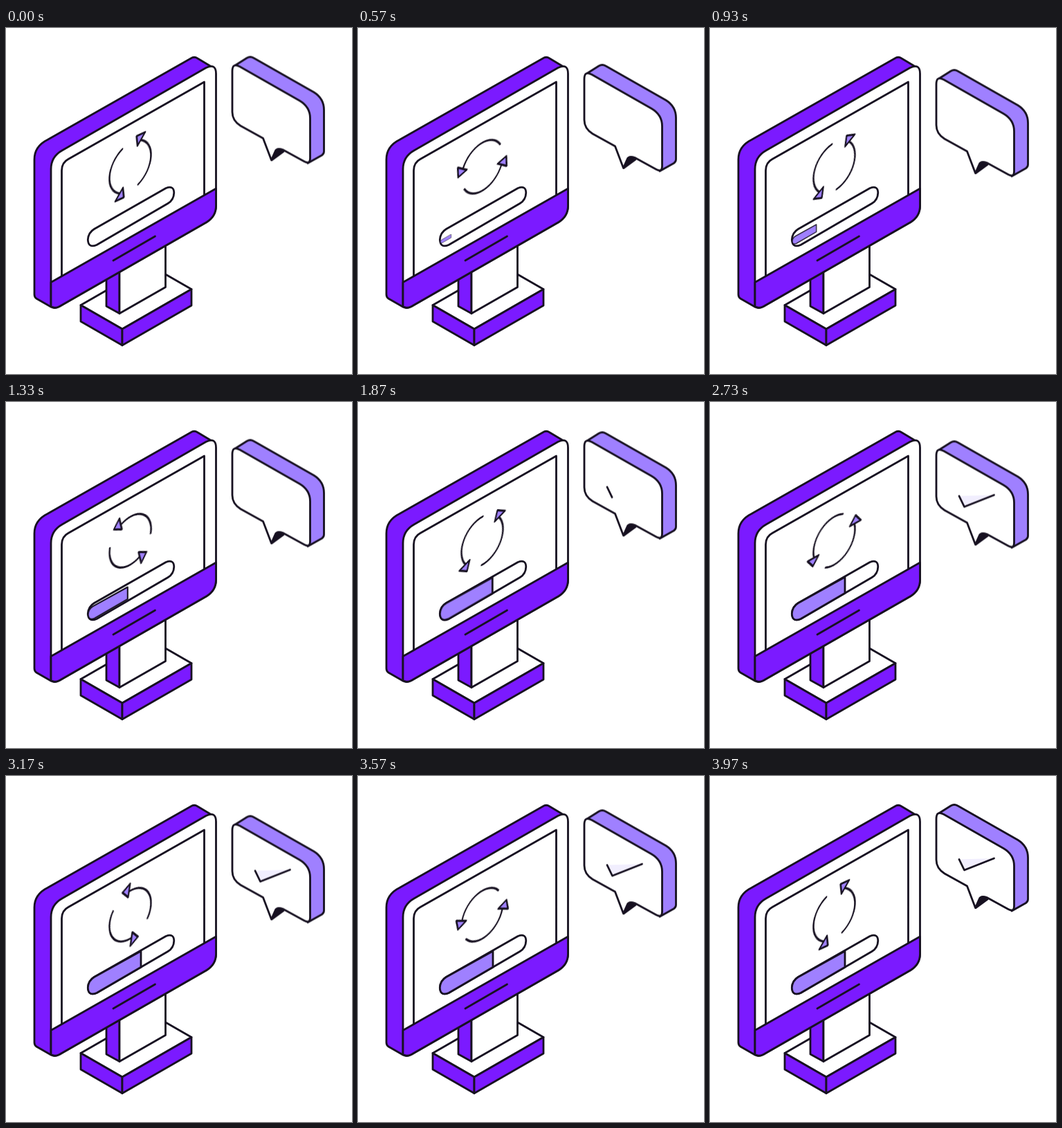
An HTML page without scripts for the animation above (4 s loop, 500x500 px).

```html
<!DOCTYPE html>
<html lang="en">
<head>
<meta charset="utf-8">
<title>Updating</title>
<style>
  :root {
    --ink: #171121;
    --violet: #7b1aff;
    --lilac: #9f80ff;
  }
  html, body { margin: 0; width: 100%; height: 100%; overflow: hidden; background: #fff; }
  svg { display: block; width: 100vw; height: 100vh; }
  .art { stroke: var(--ink); stroke-width: 2.8; stroke-linejoin: round; stroke-linecap: round; fill: none; }
  .white { fill: #fff; }
  .violet { fill: var(--violet); }
  .lilac { fill: var(--lilac); }
  .dark { fill: var(--ink); }

  .spin, .fill, .bubble, .tick { animation: 4s linear infinite; }
  .spin { animation-name: spin; }
  .fill { animation-name: load; transform-origin: 119.4px 309.7px; }
  .bubble { animation-name: bob; }
  .tick { animation-name: draw; stroke-dasharray: 1 3; fill: #f1eefe; }

  @keyframes spin {
    0%, .8% { transform: rotate(0deg); }
    99.25%, 100% { transform: rotate(-720deg); }
  }
  @keyframes load {
    0% { transform: scale(0); animation-timing-function: cubic-bezier(.333, 0, .667, 1); }
    49.63%, 100% { transform: scale(1); }
  }
  @keyframes bob {
    0%, 24.8%, 49.63%, 74.4% { animation-timing-function: cubic-bezier(.333, 0, .667, 1); }
    0%, 49.63%, 99.25%, 100% { transform: translateY(0); }
    24.8%, 74.4% { transform: translateY(20.5px); }
  }
  @keyframes draw {
    0%, 40% { stroke-dashoffset: 1.1; animation-timing-function: cubic-bezier(.333, 0, .667, 1); }
    0%, 47.5% { fill-opacity: 0; }
    57.75%, 100% { stroke-dashoffset: 0; fill-opacity: 1; }
  }
</style>
</head>
<body>
<svg viewBox="0 0 500 500">
  <defs>
    <g id="arrow">
      <path d="M13 32.100A34.600 34.600 0 0 0 17.800 -29.700"/>
      <path class="lilac" d="M10.600 -39L25 -37.500L12.200 -24.300Z"/>
    </g>
  </defs>
  <g class="art">
    <!-- stand -->
    <path class="white" d="M108 400.500L208 343L268 377.500L168 435Z"/>
    <path class="violet" d="M108 400.500L168 435V458.500L108 424Z"/>
    <path class="violet" d="M168 435L268 377.500V401L168 458.500Z"/>
    <path class="violet" d="M145 340V402L164 412.500V340Z"/>
    <path class="white" d="M164 340V412.500L230.500 374.500V300Z"/>

    <!-- monitor -->
    <path class="violet" d="M65 403L44 391Q41 389 41 385V190Q41 171 60 161.500L267 44Q272 40.500 277 44L297 56L290 150L80 380Z"/>
    <path class="white" d="M65 402.500V204Q65 186 81 177L289 57.500Q303.500 50.500 303.500 66V257Q303.500 272 290 280.500L77 402.500Q70 406 65 402.500Z"/>
    <path class="violet" d="M65 367.500L303.500 232V257Q303.500 272 290 280.500L77 402.500Q70 406 65 402.500Z"/>
    <path d="M80.500 358V206Q80.500 194.500 90 189.500L286.500 78V240.500"/>
    <path d="M155 336L215.500 301"/>

    <!-- progress -->
    <path class="white" d="M127.500 290.500L231 231.500Q242.500 227 242.800 238Q242.500 248.500 234 253.500L131 313.500Q119 318.500 118.300 306Q119 295.500 127.500 290.500Z"/>
    <path class="fill lilac" d="M195 253V276.300L131 313.500Q119 318.500 118.300 306Q119 295.500 127.500 290.500Z"/>

    <!-- sync arrows -->
    <g transform="matrix(.866 -.5 0 1 179.5 200.5)">
      <g class="spin">
        <use href="#arrow"/>
        <use href="#arrow" transform="rotate(180)"/>
      </g>
    </g>

    <!-- speech bubble -->
    <g class="bubble">
      <path class="lilac" d="M329 55L348 43Q353 40 358 43L445 92.500Q459.500 101.500 459.500 118V178Q459.500 181.500 456.500 183.500L436 195L420 130Z"/>
      <path class="dark" d="M384 190.500L391 175L401 178Z"/>
      <path class="white" d="M327 62Q327 49.500 338 55.500L424 104.500Q439.500 113.500 439.500 130V188Q439.500 197 431 192.500L400 175.500Q391 172.500 389 178L383.500 190.500L371.500 159L339 141Q327 133.500 327 121Z"/>
      <path class="tick" pathLength="1" d="M360 120.500L367.500 136L410.500 119"/>
    </g>
  </g>
</svg>
</body>
</html>
```
